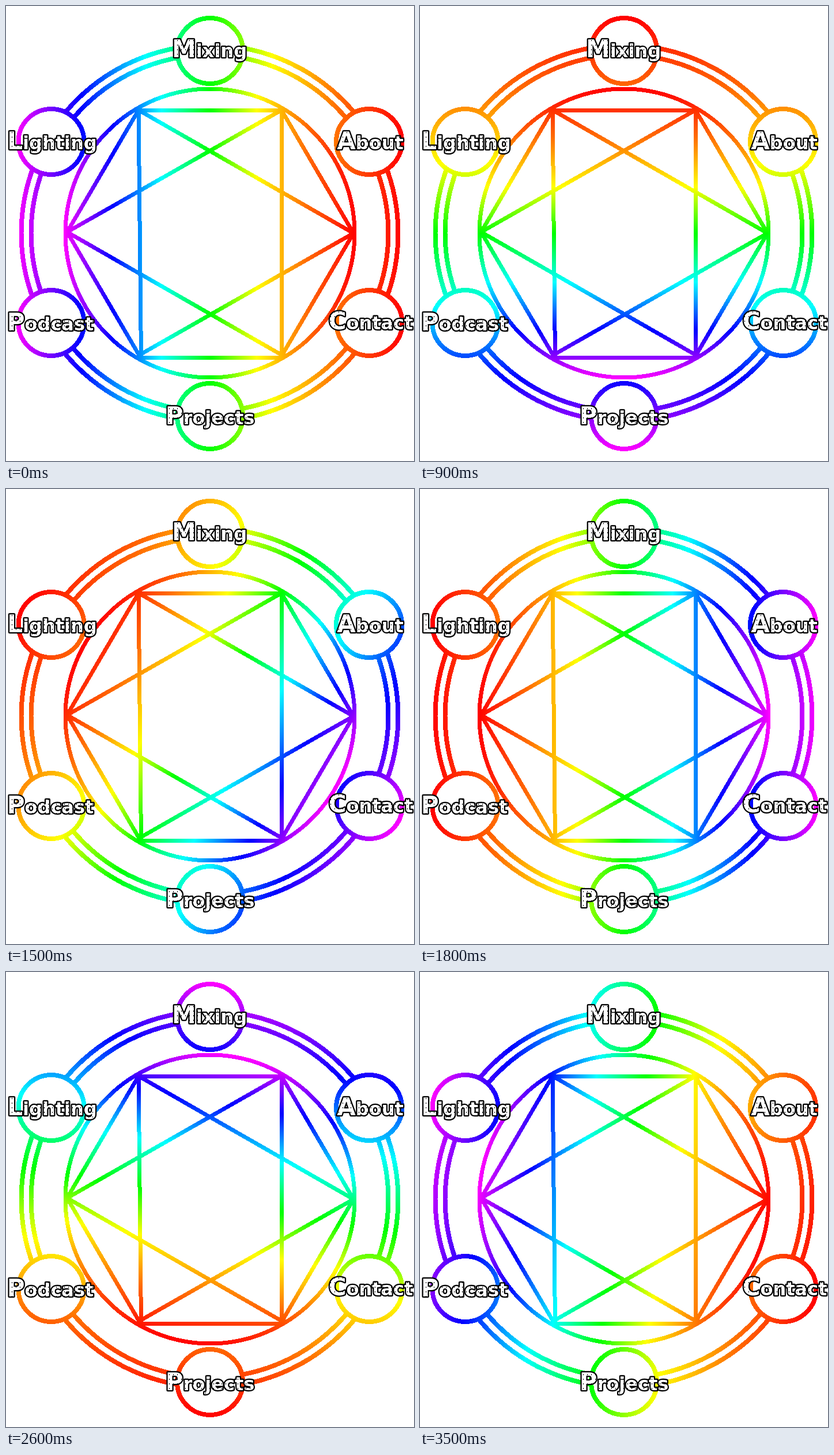
These frames come from a looping animation (708x791 px, 3.6 s). An HTML page:

```html
<!DOCTYPE html>
<html lang="en">
<head>
<meta charset="utf-8">
<title>Rainbow wheel menu</title>
<style>
  html, body { margin: 0; width: 100%; height: 100%; overflow: hidden; background: #fff; }
  svg { display: block; width: 708px; height: 791px; }
  circle, path { shape-rendering: crispEdges; }
  .ring { fill: none; stroke: url(#outer); stroke-width: 8; }
  .node { fill: #fff; stroke: url(#outer); stroke-width: 8; }
  .star { fill: none; stroke: url(#inner); stroke-width: 7; stroke-linejoin: round; }
  text {
    font: bold 32px "DejaVu Sans", Verdana, sans-serif;
    text-anchor: middle; fill: url(#speckle); stroke: #000; stroke-width: 4.5;
    stroke-linejoin: round; paint-order: stroke;
  }
  .cap { font-size: 42px; }
</style>
</head>
<body>
<svg id="stage" viewBox="0 0 708 791" xmlns="http://www.w3.org/2000/svg">
  <pattern id="speckle" width="7" height="8" patternUnits="userSpaceOnUse">
    <rect width="7" height="8" fill="#fff"/>
    <circle cx="3.5" cy="4" r="0.9"/>
  </pattern>
</svg>
<script>
const SVG = "http://www.w3.org/2000/svg";
const stage = document.getElementById("stage");
const STEP = 100, STEPS = 36;
const CENTER = { x: 354, y: 395.5 };
const NODE_RADIUS = 57;
const INNER_REACH = 253;

const SPECTRUM = [
  [0, "#f0f"], [1 / 6, "#00f"], [1 / 3, "#0ff"], [1 / 2, "#0f0"],
  [0.66, "#ff0"], [5 / 6, "#ff6a00"], [1, "#f00"]
];

// label, circle centre, label centre and baseline
const NODES = [
  ["Mixing", 354, 78, 353, 89],
  ["About", 630, 236, 632, 249],
  ["Contact", 630.5, 551, 633, 562],
  ["Projects", 354, 713, 354, 727],
  ["Podcast", 78.5, 551, 77, 564],
  ["Lighting", 78.5, 236, 80, 249]
];

// The star is one upright box and two slanted ones.
const BOXES = [
  "M230 181H478L479 611H234.5Z",
  "M106 393L230 181L603 395L231 607Z",
  "M603 395L478 181L106 393L479 607Z"
];

function add(parent, tag, attrs = {}, content = "") {
  const el = document.createElementNS(SVG, tag);
  for (const key in attrs) el.setAttribute(key, attrs[key]);
  el.textContent = content;
  return parent.appendChild(el);
}

function addGradient(id) {
  const gradient = add(stage, "linearGradient", { id, gradientUnits: "userSpaceOnUse" });
  for (const [offset, color] of SPECTRUM) add(gradient, "stop", { offset, "stop-color": color });
  return gradient;
}

function aim(gradient, angle, reach) {
  const dx = Math.cos(angle) * reach, dy = -Math.sin(angle) * reach;
  gradient.setAttribute("x1", CENTER.x - dx);
  gradient.setAttribute("y1", CENTER.y - dy);
  gradient.setAttribute("x2", CENTER.x + dx);
  gradient.setAttribute("y2", CENTER.y + dy);
}

// Distance from the centre to the far edge of the six nodes in one direction.
function outerReach(angle) {
  const dots = NODES.map(([, x, y]) =>
    (x - CENTER.x) * Math.cos(angle) - (y - CENTER.y) * Math.sin(angle));
  return Math.max(...dots) + NODE_RADIUS + 3;
}

const outer = addGradient("outer");
const inner = addGradient("inner");

for (const r of [327, 310]) add(stage, "circle", { class: "ring", cx: 353.5, cy: 395, r });
add(stage, "circle", { class: "star", cx: 354, cy: 395, r: 251 });
for (const d of BOXES) add(stage, "path", { class: "star", d });
for (const [, cx, cy] of NODES) add(stage, "circle", { class: "node", cx, cy, r: NODE_RADIUS });

for (const [label, , , x, y] of NODES) {
  const text = add(stage, "text", { x, y });
  add(text, "tspan", { class: "cap" }, label[0]);
  add(text, "tspan", {}, label.slice(1));
}

function draw(time) {
  const step = Math.floor(time / STEP) % STEPS;
  const angle = step / STEPS * 2 * Math.PI;
  aim(outer, angle, outerReach(angle));
  aim(inner, angle, INNER_REACH);
}

const start = performance.now();
function tick() {
  draw(performance.now() - start);
  requestAnimationFrame(tick);
}
tick();
</script>
</body>
</html>
```
